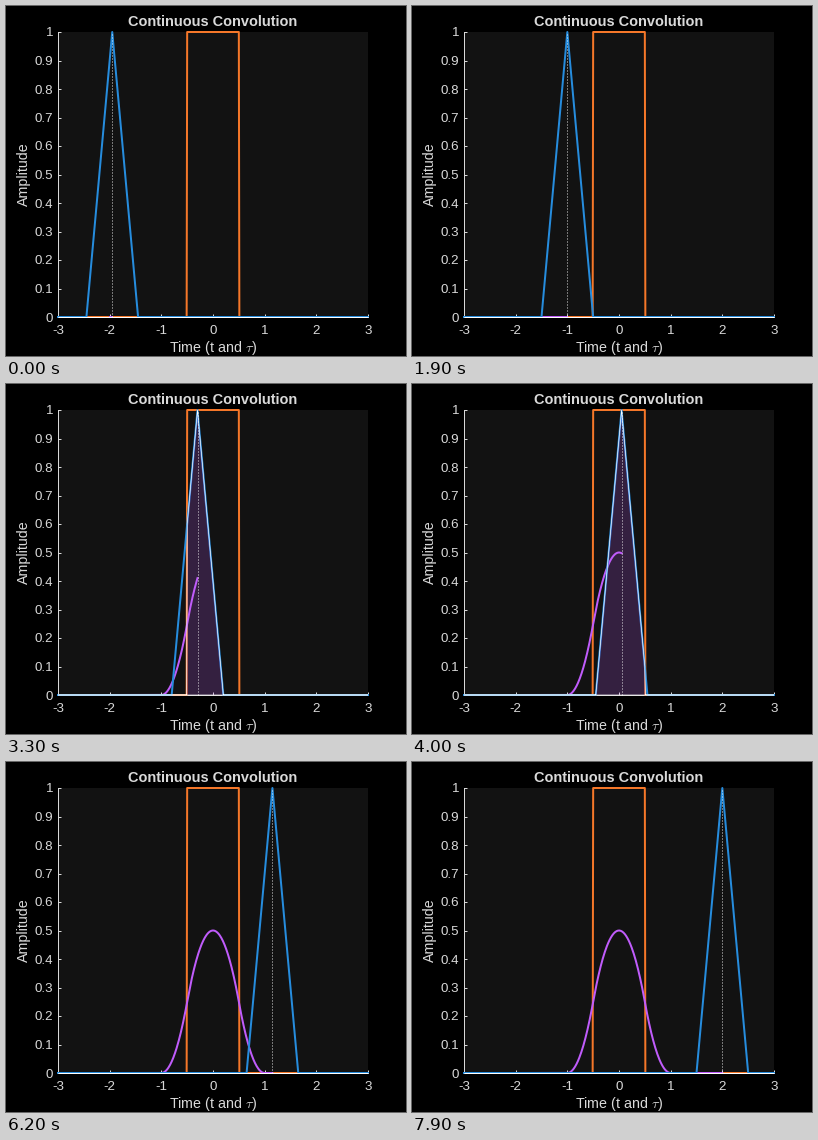
A matplotlib script that plays this animation: 400 px wide and 350 px high, repeating every 8000 ms.

```python
import numpy as np
import matplotlib.pyplot as plt
from matplotlib.animation import FuncAnimation
from matplotlib.patches import Polygon

WIDTH, HEIGHT = 400, 350
LEFT, TOP, BOX_W, BOX_H = 52, 26, 310, 285
PX = 0.72  # points per pixel at 100 dpi
FRAMES, INTERVAL = 80, 100

BLUE, ORANGE, PURPLE = "#268cdd", "#f57729", "#c05cfb"
INK, PANEL = "#d9d9d9", "#121212"

plt.rcParams["font.family"] = "Liberation Sans"
plt.rcParams["mathtext.fontset"] = "cm"

fig = plt.figure(figsize=(WIDTH / 100, HEIGHT / 100), dpi=100, facecolor="black")
ax = fig.add_axes([LEFT / WIDTH, 1 - (TOP + BOX_H) / HEIGHT,
                   BOX_W / WIDTH, BOX_H / HEIGHT], facecolor=PANEL)
ax.set(xlim=(-3, 3), ylim=(0, 1), xticks=range(-3, 4), yticks=np.arange(11) / 10)
ax.tick_params(direction="in", length=3 * PX, width=PX, color=INK,
               labelbottom=False, labelleft=False)
for side, spine in ax.spines.items():
    spine.set(visible=side in ("left", "bottom"), color=INK, linewidth=PX)


def label(x, y, text, size=13.33, ha="center", **style):
    fig.text(x / WIDTH, 1 - y / HEIGHT, text, fontsize=size * PX, color=INK,
             ha=ha, va="baseline", **style)


def curve(color, zorder, width=2, **style):
    return ax.plot([], [], color=color, lw=width * PX, zorder=zorder,
                   clip_on=False, solid_joinstyle="round", **style)[0]


label(207, 20, "Continuous Convolution", 14.5, weight="bold")
label(207, 346, r"Time (t and $\tau$)", 14.2)
label(22, 168, "Amplitude", 14.2, rotation=90, rotation_mode="anchor")
for v in range(-3, 4):
    label(LEFT + (v + 3) * BOX_W / 6, 328, str(v))
for k in range(11):
    label(47, TOP + BOX_H * (1 - k / 10) + 4.5, f"{k / 10:g}", ha="right")

tau = np.linspace(-3, 3, 601)
pulse = (np.abs(tau) < 0.5001).astype(float)


def triangle(t):
    return np.maximum(0, 1 - 2 * np.abs(tau - t))


def convolution(t):
    a = np.abs(t)
    return np.where(a <= 0.5, 0.5 - a**2, np.maximum(0, 1 - a) ** 2)


curve(ORANGE, 3).set_data(tau, pulse)
result = curve(PURPLE, 4)
moving = curve(BLUE, 5)
overlap = Polygon([(0, 0), (0, 0)], closed=True, facecolor=(0.752, 0.36, 0.984, 0.2),
                  edgecolor="white", lw=0.67 * PX, zorder=6, clip_on=False)
ax.add_patch(overlap)
marker = curve("white", 7, 1, linestyle=(0, (1, 2)), alpha=0.85)


def draw(i):
    t = -1.95 + 0.05 * i
    tri = triangle(t)
    past = np.linspace(-2, t, 300)
    result.set_data(past, convolution(past))
    moving.set_data(tau, tri)
    outline = np.column_stack([tau, tri * pulse])
    overlap.set_xy(np.vstack([outline, [(3, 0), (-3, 0)]]))
    marker.set_data([t, t], [0, 1])
    return result, moving, overlap, marker


anim = FuncAnimation(fig, draw, frames=FRAMES, interval=INTERVAL, repeat=True,
                     repeat_delay=0, init_func=lambda: draw(0))
plt.show()
```
